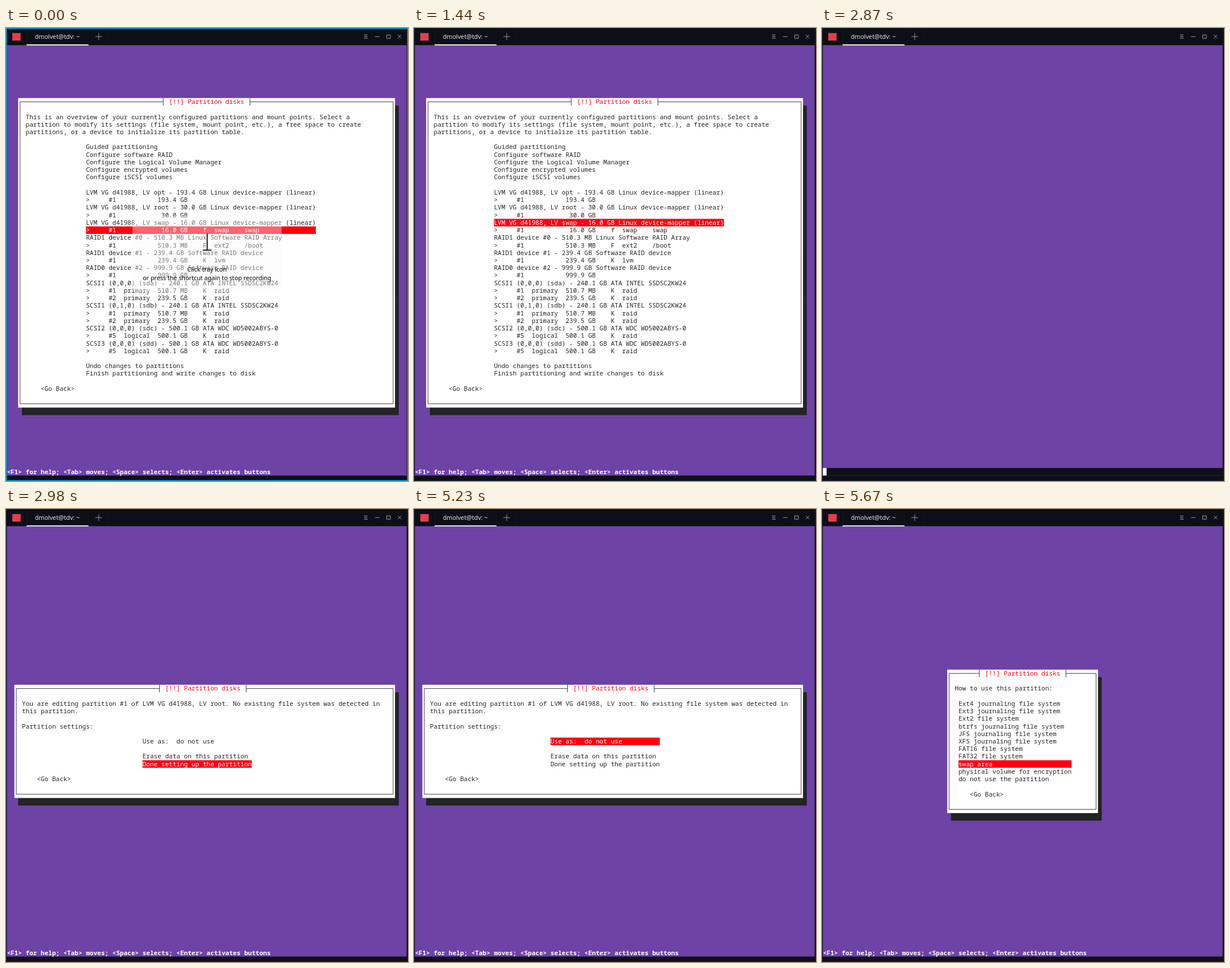
Animation, 706 px wide and 794 px high, one loop 8000 ms. Source, as an HTML page with a canvas:

```html
<!DOCTYPE html>
<html lang="en">
<head>
<meta charset="utf-8">
<title>Partition disks</title>
<style>
html, body { margin: 0; width: 100%; height: 100%; overflow: hidden; background: #0e1019; }
canvas { display: block; }
</style>
</head>
<body>
<canvas width="706" height="794"></canvas>
<script>
const ctx = document.querySelector('canvas').getContext('2d');
const W = 960, H = 1080;               // drawing units
const CELL_W = 9, CELL_H = 18, COLS = 106, ROWS = 57;
const BACK = '#0e1019', BLACK = '#232323', RED = '#ff000f', PURPLE = '#6d43a6', WHITE = '#ffffff';
const MONO = '15px "Noto Sans Mono", monospace';
const SANS = '14.6px "Noto Sans", sans-serif';
const TITLE = '[!!] Partition disks';

const colX = col => 2 + col * CELL_W;
const rowY = row => 41 + row * CELL_H;

// Each dialog: cell box, list column and width, text blocks as [row, col, lines].
const overview = {
  col: 3, row: 7, w: 100, h: 41, listCol: 21, listW: 61,
  blocks: [
    [9, 5, `This is an overview of your currently configured partitions and mount points. Select a
partition to modify its settings (file system, mount point, etc.), a free space to create
partitions, or a device to initialize its partition table.`],
    [13, 21, `Guided partitioning
Configure software RAID
Configure the Logical Volume Manager
Configure encrypted volumes
Configure iSCSI volumes

LVM VG d41988, LV opt - 193.4 GB Linux device-mapper (linear)
>     #1           193.4 GB
LVM VG d41988, LV root - 30.0 GB Linux device-mapper (linear)
>     #1            30.0 GB
LVM VG d41988, LV swap - 16.0 GB Linux device-mapper (linear)
>     #1            16.0 GB    f  swap    swap
RAID1 device #0 - 510.3 MB Linux Software RAID Array
>     #1           510.3 MB    F  ext2    /boot
RAID1 device #1 - 239.4 GB Software RAID device
>     #1           239.4 GB    K  lvm
RAID0 device #2 - 999.9 GB Software RAID device
>     #1           999.9 GB
SCSI1 (0,0,0) (sda) - 240.1 GB ATA INTEL SSDSC2KW24
>     #1  primary  510.7 MB    K  raid
>     #2  primary  239.5 GB    K  raid
SCSI1 (0,1,0) (sdb) - 240.1 GB ATA INTEL SSDSC2KW24
>     #1  primary  510.7 MB    K  raid
>     #2  primary  239.5 GB    K  raid
SCSI2 (0,0,0) (sdc) - 500.1 GB ATA WDC WD5002ABYS-0
>     #5  logical  500.1 GB    K  raid
SCSI3 (0,0,0) (sdd) - 500.1 GB ATA WDC WD5002ABYS-0
>     #5  logical  500.1 GB    K  raid

Undo changes to partitions
Finish partitioning and write changes to disk`],
    [45, 9, '<Go Back>']
  ]
};
const settings = {
  col: 2, row: 21, w: 101, h: 15, listCol: 36, listW: 29,
  blocks: [
    [23, 4, `You are editing partition #1 of LVM VG d41988, LV root. No existing file system was detected in
this partition.

Partition settings:`],
    [28, 36, `Use as:  do not use

Erase data on this partition
Done setting up the partition`],
    [33, 8, '<Go Back>']
  ]
};
const usage = {
  col: 33, row: 19, w: 40, h: 19, listCol: 36, listW: 30,
  blocks: [
    [21, 35, 'How to use this partition:'],
    [23, 36, `Ext4 journaling file system
Ext3 journaling file system
Ext2 file system
btrfs journaling file system
JFS journaling file system
XFS journaling file system
FAT16 file system
FAT32 file system
swap area
physical volume for encryption
do not use the partition`],
    [35, 39, '<Go Back>']
  ]
};

// [start ms, dialog, selected row]
const timeline = [
  [0, overview, 24], [1440, overview, 23], [2130, overview, 22],
  [2870, null], [2980, settings, 31], [4000, settings, 30],
  [4590, settings, 29], [5230, settings, 28],
  [5580, null], [5670, usage, 31]
];
const LOOP = 8000, OVERLAY_END = 50;

function rect(x, y, w, h, color) {
  ctx.fillStyle = color;
  ctx.fillRect(x, y, w, h);
}

function cells(col, row, w, h, color) {
  rect(colX(col), rowY(row), w * CELL_W, h * CELL_H, color);
}

function print(row, col, text, color, weight = '') {
  ctx.font = weight + MONO;
  ctx.fillStyle = color;
  ctx.textAlign = 'left';
  [...text].forEach((ch, i) => {
    if (ch !== ' ') ctx.fillText(ch, colX(col + i), rowY(row) + 14);
  });
}

function label(text, x, y, color, align = 'left') {
  ctx.font = SANS;
  ctx.fillStyle = color;
  ctx.textAlign = align;
  ctx.fillText(text, x, y);
}

function strokePath(d, color, width) {
  ctx.strokeStyle = color;
  ctx.lineWidth = width;
  ctx.stroke(new Path2D(d));
}

function drawWindow(active) {
  rect(0, 0, W, H, BACK);
  rect(0, 0, W, 41, '#0d0f16');
  for (const x of [49, 196, 245]) rect(x, 2, 1, 38, '#161922');
  rect(15, 12, 20, 18, '#e0404f');
  label('dmolvet@tdv: ~', 69, 26, '#e2e8ee');
  strokePath('M213.5 20.5h16M221.5 12.5v16', '#a9adb3', 1.2);
  strokePath('M855 16.5h8M855 20.5h8M855 24.5h9M881 20.5h11M909 16.5h9v8h-9zM936 16l8 8M944 16l-8 8', '#b4b7bc', 1.2);

  rect(2, 41, 955, ROWS * CELL_H, PURPLE);
  rect(49, 39, 148, 2.5, WHITE);
  rect(957, 41, 3, H - 41, '#0b0d14');
  ctx.strokeStyle = active ? '#0aa0dc' : '#20232b';
  ctx.lineWidth = active ? 3 : 1.6;
  ctx.strokeRect(0.5, 0.5, W - 1, H - 1);
}

function drawDialog(d, selected) {
  cells(d.col + 1, d.row + 1, d.w, d.h, BLACK);
  cells(d.col, d.row, d.w, d.h, WHITE);

  const gap = d.col + Math.floor((d.w - TITLE.length - 4) / 2);
  const left = colX(d.col) + 4.5, right = colX(d.col + d.w) - 4.5;
  const top = rowY(d.row) + 9, bottom = rowY(d.row + d.h) - 9;
  const gapL = colX(gap) + 4.5, gapR = colX(gap + TITLE.length + 3) + 4.5;
  strokePath(`M${gapL} ${top}H${left}V${bottom}H${right}V${top}H${gapR}
    M${gapL} ${top - 9}v18M${gapR} ${top - 9}v18`, BLACK, 1.2);
  print(d.row, gap + 2, TITLE, RED);

  cells(d.listCol, selected, d.listW, 1, RED);
  for (const [row, col, text] of d.blocks) {
    text.split('\n').forEach((line, i) =>
      print(row + i, col, line, row + i === selected ? WHITE : BLACK));
  }
  print(ROWS - 1, 0, '<F1> for help; <Tab> moves; <Space> selects; <Enter> activates buttons', WHITE, 'bold ');
}

function drawBlank() {
  rect(2, rowY(ROWS - 1), 955, CELL_H, BACK);
  cells(0, ROWS - 1, 1, 1, '#fffaf4');
}

function drawRecorderHint() {
  ctx.fillStyle = 'rgba(247,247,247,.4)';
  ctx.beginPath();
  ctx.roundRect(302, 448, 356, 182, 6);
  ctx.fill();
  strokePath('M480.5 490v39M470 529.5h21', '#000', 2.4);
  label('Click tray icon', 480, 581, '#000', 'center');
  label('or press the shortcut again to stop recording', 480, 601, '#000', 'center');
}

function draw() {
  const t = performance.now() % LOOP;
  const [, dialog, selected] = timeline.findLast(([start]) => start <= t);
  const recording = t >= OVERLAY_END;
  ctx.setTransform(706 / W, 0, 0, 794 / H, 0, 0);
  drawWindow(!recording);
  if (dialog) drawDialog(dialog, selected);
  else drawBlank();
  if (!recording) drawRecorderHint();
  requestAnimationFrame(draw);
}
draw();
</script>
</body>
</html>
```
